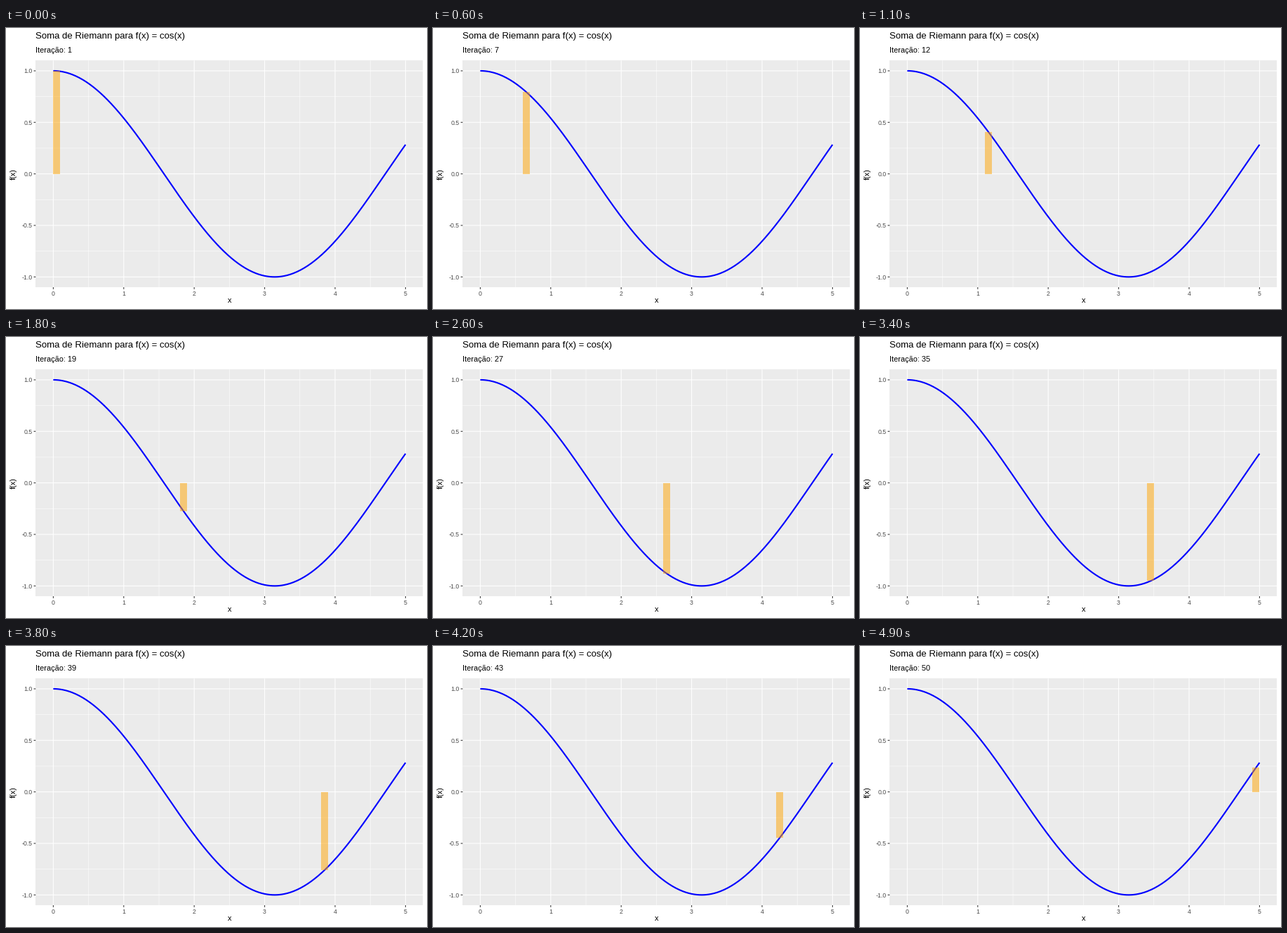
Animation, 600 px wide and 400 px high, one loop 5 s. Source, as a matplotlib script:

```python
import matplotlib.pyplot as plt
import numpy as np
from matplotlib.animation import FuncAnimation
from matplotlib.patches import Rectangle

WIDTH, HEIGHT, DPI = 600, 400, 100
PT = 72 / DPI  # points per pixel
LEFT, RIGHT, TOP, BOTTOM = 42.3, 594.5, 46.3, 369.0
STEPS, DX = 50, 0.1
TICK = 2.75

plt.rcParams["font.family"] = "Liberation Sans"


def px(x):
    return LEFT + (x + 0.25) * (RIGHT - LEFT) / 5.5


def py(y):
    return BOTTOM - (y + 1.1) * (BOTTOM - TOP) / 2.2


fig = plt.figure(figsize=(WIDTH / DPI, HEIGHT / DPI), dpi=DPI, facecolor="white")
ax = fig.add_axes([0, 0, 1, 1])
ax.set_xlim(0, WIDTH)
ax.set_ylim(HEIGHT, 0)
ax.axis("off")


def line(xs, ys, color, width, z):
    ax.plot(xs, ys, color=color, lw=width * PT, snap=False, zorder=z,
            solid_capstyle="butt", solid_joinstyle="round")


def label(x, y, text, size, color="black", **kwargs):
    kwargs.setdefault("va", "baseline")
    return ax.text(x, y, text, fontsize=size * PT, color=color, **kwargs)


def box(x0, y0, x1, y1, **kwargs):
    patch = Rectangle((x0, y0), x1 - x0, y1 - y0, linewidth=0, **kwargs)
    return ax.add_patch(patch)


box(round(LEFT), round(TOP), 594, round(BOTTOM), facecolor="#ebebeb", zorder=0)

for x in np.arange(0.5, 5):
    line([px(x)] * 2, [TOP, BOTTOM], "white", 0.53, 1)
for y in np.arange(-0.75, 1, 0.5):
    line([LEFT, RIGHT], [py(y)] * 2, "white", 0.53, 1)

for x in range(6):
    line([px(x)] * 2, [TOP, BOTTOM], "white", 1.07, 2)
    line([px(x)] * 2, [BOTTOM, BOTTOM + TICK], "#333333", 1.07, 2)
    label(px(x), 381, str(x), 8.8, "#4d4d4d", ha="center")
for y in np.arange(-1, 1.1, 0.5):
    line([LEFT, RIGHT], [py(y)] * 2, "white", 1.07, 2)
    line([LEFT - TICK, LEFT], [py(y)] * 2, "#333333", 1.07, 2)
    label(LEFT - 4.95, round(py(y) + 3.2), f"{y:.1f}", 8.8, "#4d4d4d", ha="right")

curve_x = np.linspace(0, 5, 300)
line(px(curve_x), py(np.cos(curve_x)), "blue", 2.13, 3)

label(LEFT, 15, "Soma de Riemann para f(x) = cos(x)", 13.2)
subtitle = label(LEFT, 35, "", 11)
label((LEFT + RIGHT) / 2, 391, "x", 11, ha="center")
label(14, py(0), "f(x)", 11, rotation=90, rotation_mode="anchor", ha="center")

bar = box(0, 0, 0, 0, facecolor="orange", alpha=0.5, zorder=4)


def update(i):
    x0, x1 = round(px(i * DX)), round(px((i + 1) * DX))
    base, tip = round(py(0)), round(py(np.cos((i + 0.5) * DX)))
    bar.set_bounds(x0, min(base, tip), x1 - x0, abs(base - tip))
    subtitle.set_text(f"Iteração: {i + 1}")
    return bar, subtitle


anim = FuncAnimation(fig, update, frames=STEPS, interval=100, repeat=True)
plt.show()
```
